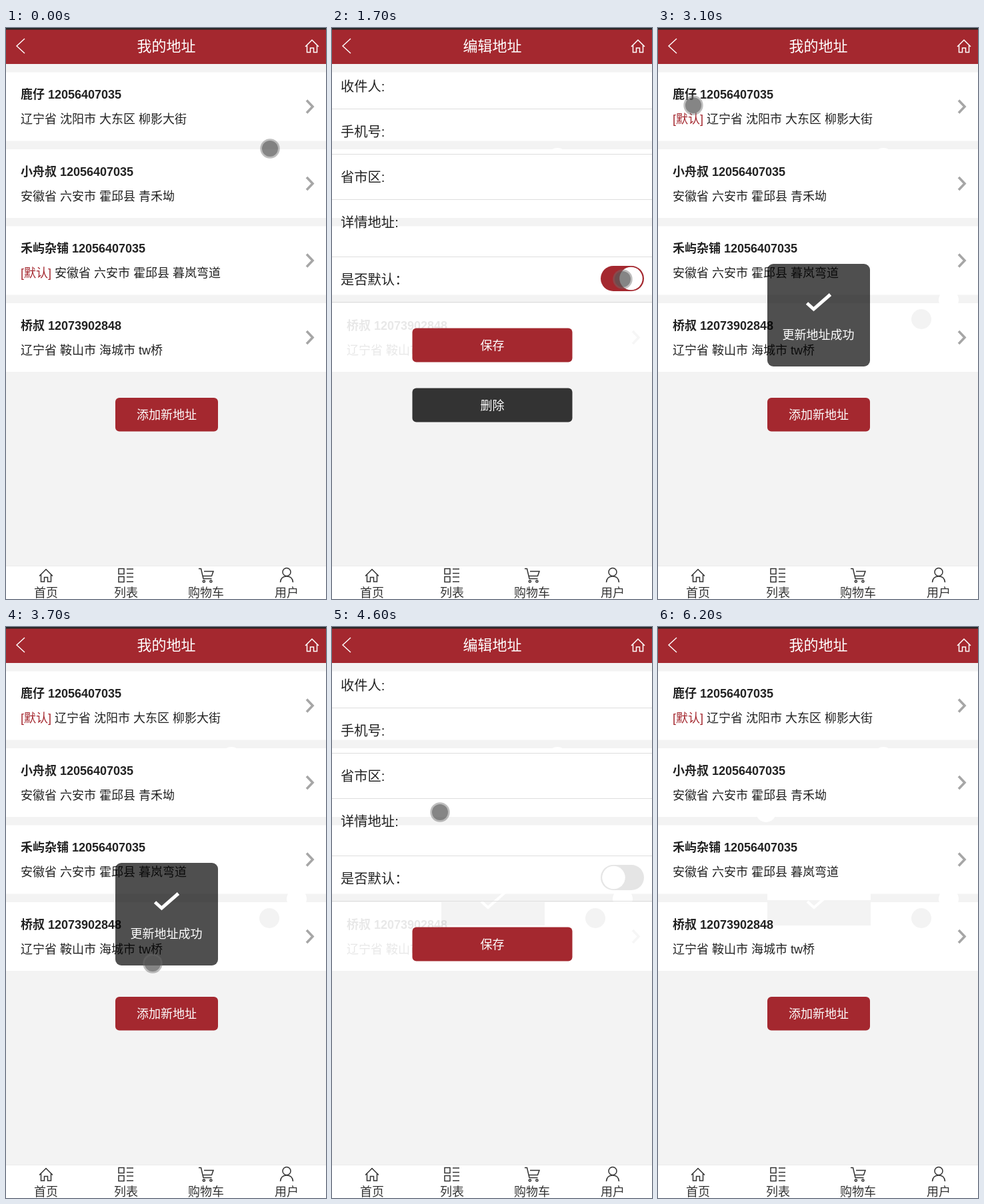
These frames come from a looping animation (480 px wide and 857 px high, 7 s). An HTML page with a canvas:

```html
<!DOCTYPE html>
<html lang="zh-CN">
<head>
<meta charset="utf-8">
<title>我的地址</title>
<style>
html, body { margin: 0; width: 100%; height: 100%; overflow: hidden; background: #f3f3f3; }
canvas { display: block; width: 100%; height: 100%; }
</style>
</head>
<body>
<canvas id="stage"></canvas>
<script>
const W = 480, H = 857, LOOP = 7000, STEP = 100;
const RED = '#a4282f', GREY = '#f3f3f3', INK = '#222';
const FONT = '"Liberation Sans", "Noto Sans CJK SC", "Noto Sans CJK", sans-serif';

const canvas = document.getElementById('stage');
const ctx = canvas.getContext('2d');
const ratio = window.devicePixelRatio || 1;
canvas.width = W * ratio;
canvas.height = H * ratio;
ctx.scale(ratio, ratio);

const cards = [
  ['鹿仔 12056407035', '辽宁省 沈阳市 大东区 柳影大街'],
  ['小舟叔 12056407035', '安徽省 六安市 霍邱县 青禾坳'],
  ['禾屿杂铺 12056407035', '安徽省 六安市 霍邱县 暮岚弯道'],
  ['桥叔 12073902848', '辽宁省 鞍山市 海城市 tw桥']
];
const fields = [
  ['收件人:', 87, 121], ['手机号:', 155, 189], ['省市区:', 223, 257],
  ['详情地址:', 291, 343], ['是否默认：', 377, 411]
];
const icons = {
  back: 'M6-11L-6 0L6 11',
  home: 'M-10 1L0-9L10 1M-7.5-1V9.5H-2.5V3H2.5V9.5H7.5V-1',
  list: 'M-11-10h8v8h-8zM-11 2h8v8h-8zM1-9.5H11M1-3H11M1 2.5H11M1 9.5H11',
  cart: 'M-11-10H-7.5L-4 5H8.5M-6.5-6M-3-6H11L8.5 1H-4.5M-1.5 9a1.6 1.6 0 1 1-3.2 0a1.6 1.6 0 1 1 3.2 0M9 9a1.6 1.6 0 1 1-3.2 0a1.6 1.6 0 1 1 3.2 0',
  user: 'M6-5a6 6 0 1 1-12 0a6 6 0 1 1 12 0M-9.5 10.5C-9 4-5 1.5 0 1.5S9 4 9.5 10.5',
  next: 'M-4.5-9.5L4.5 0L-4.5 9.5',
  tick: 'M-17 1L-7 10L18-12'
};
const tabs = [['home', '首页', 60], ['list', '列表', 180], ['cart', '购物车', 300], ['user', '用户', 421]];

// time, x, y
const touch = [
  [0, 396, 181], [300, 396, 181], [700, 264, 128], [1000, 264, 128],
  [1200, 338, 195], [1400, 428, 345], [1500, 436, 377], [1700, 436, 377],
  [1800, 436, 408], [1900, 395, 437], [2000, 331, 481], [2300, 331, 481],
  [2900, 53, 116], [3200, 53, 116], [3700, 220, 505], [3800, 227, 568],
  [4200, 227, 568], [4600, 162, 278], [4800, 118, 121], [5000, 19, 16],
  [5200, 19, 16], [5900, 398, 16]
];
const toastFade = [[2100, 0], [2200, .27], [2300, .7], [2400, 1], [4200, 1], [4500, 0]];
// spots the touch leaves behind: time, x, y, colour
const trail = [
  [1300, 338, 195, '#fff'], [1900, 436, 408, '#fff'],
  [2000, 395, 437, GREY], [4700, 162, 278, '#fff']
];

function at(keys, t) {
  const i = keys.findIndex(k => k[0] > t);
  if (i < 0) return keys[keys.length - 1].slice(1);
  if (i === 0) return keys[0].slice(1);
  const a = keys[i - 1], b = keys[i], p = (t - a[0]) / (b[0] - a[0]);
  return a.slice(1).map((v, n) => v + (b[n + 1] - v) * p);
}

function rect(x, y, w, h, color, r = 0) {
  ctx.fillStyle = color;
  ctx.beginPath();
  ctx.roundRect(x, y, w, h, r);
  ctx.fill();
}

function disc(x, y, r, color) {
  ctx.fillStyle = color;
  ctx.beginPath();
  ctx.arc(x, y, r, 0, Math.PI * 2);
  ctx.fill();
}

// y is the middle of the glyphs
function text(str, x, y, size, color, align = 'left', weight = 'normal') {
  ctx.font = `${weight} ${size}px ${FONT}`;
  ctx.textAlign = align;
  ctx.fillStyle = color;
  ctx.fillText(str, x, y + size * .37);
}

function icon(name, x, y, color, width) {
  ctx.save();
  ctx.translate(x, y);
  ctx.strokeStyle = color;
  ctx.lineWidth = width;
  ctx.stroke(new Path2D(icons[name]));
  ctx.restore();
}

function button(label, x, y, w, h, color) {
  rect(x, y, w, h, color, 6);
  text(label, x + w / 2, y + h / 2, 18, '#fff', 'center');
}

const cardTop = i => 66.5 + i * 115.5;

function cardText(i, isDefault) {
  const y = cardTop(i), [name, address] = cards[i];
  text(name, 22, y + 33, 18, INK, 'left', 'bold');
  let x = 22;
  if (isDefault) {
    text('[默认]', x, y + 70, 18, RED);
    x += ctx.measureText('[默认] ').width;
  }
  text(address, x, y + 70, 18, INK);
  icon('next', 455.5, y + 51.5, '#a6a6a6', 3.6);
}

function backdrop(t, onList) {
  rect(0, 0, W, H, GREY);
  cards.forEach((c, i) => rect(0, cardTop(i), W, 103, '#fff'));
  for (const [from, x, y, color] of trail) if (t >= from) disc(x, y, 15, color);
  if (t >= 4500) {
    if (onList) rect(164, 400, 155, 10, '#fff');
    rect(164, 410, 155, 38, GREY);
    icon('tick', 241, 411, '#fff', 4);
  }
}

function drawList(t) {
  const chosen = t < 2300 ? 2 : 0;
  cards.forEach((c, i) => cardText(i, i === chosen));
  button('添加新地址', 164, 555, 154, 50.5, RED);
}

function drawForm(t, editing) {
  ctx.globalAlpha = .1;
  cardText(3, false);
  ctx.globalAlpha = 1;
  for (const [label, y, line] of fields) {
    text(label, 13, y, 20.3, INK);
    rect(0, line, W, 1, '#dedede');
  }
  const on = editing ? at([[1500, 0], [1700, 1]], t)[0] : 0;
  rect(403, 357, 65, 38, on ? RED : '#e5e5e5', 19);
  disc(422.5 + on * 26, 376, 17.3, '#fff');
  button('保存', 120.5, 450.5, 240, 51, RED);
  if (editing) button('删除', 120.5, 540.5, 240, 51, '#333');
}

function drawBars(title) {
  rect(0, 0, W, 54, RED);
  rect(0, 0, W, 2.5, '#2a2627');
  icon('back', 22, 27, '#fff', 1.4);
  text(title, 240.5, 27, 22, '#fff', 'center');
  icon('home', 459, 27, '#fff', 1.5);
  rect(0, 807, W, 50, '#fff');
  rect(0, 807, W, 1, '#ececec');
  for (const [name, label, x] of tabs) {
    icon(name, x, 821.5, '#333', 1.5);
    text(label, x, 847, 18, '#333', 'center');
  }
}

function drawToast(alpha) {
  if (!alpha) return;
  rect(164, 354, 154, 154, `rgba(0,0,0,${.69 * alpha})`, 9);
  ctx.globalAlpha = Math.min(1, alpha * 3);
  icon('tick', 240.5, 412, '#fff', 5);
  text('更新地址成功', 240.5, 460, 18, '#fff', 'center');
  ctx.globalAlpha = 1;
}

function drawTouch(t) {
  if (t >= 6000) return;
  const [x, y] = at(touch, t);
  disc(x, y, 14.7, 'rgba(110,110,110,.45)');
  disc(x, y, 12, 'rgba(80,80,80,.52)');
}

function draw(t) {
  const editing = t >= 700 && t < 2100;
  const adding = t >= 4000 && t < 5200;
  const onList = !editing && !adding;
  backdrop(t, onList);
  if (onList) drawList(t);
  else drawForm(t, editing);
  drawBars(onList ? '我的地址' : '编辑地址');
  drawToast(at(toastFade, t)[0]);
  drawTouch(t);
}

const start = performance.now();
function tick() {
  const t = (performance.now() - start) % LOOP;
  draw(Math.floor(t / STEP) * STEP);
  requestAnimationFrame(tick);
}
tick();
</script>
</body>
</html>
```
